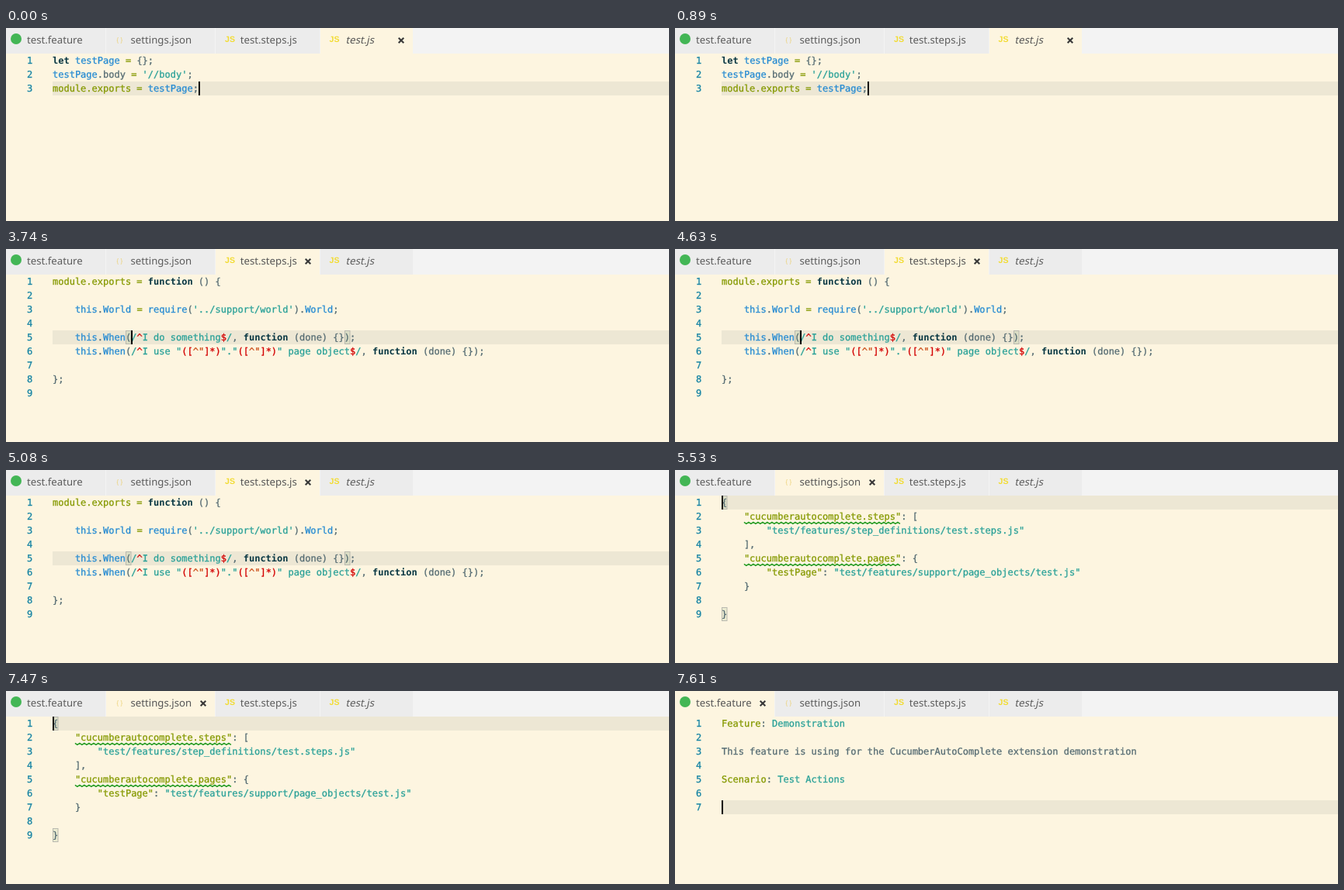
An HTML page that plays this animation: 854 by 249 pixels, repeating every 8 s.

```html
<!DOCTYPE html>
<html lang="en">
<head>
<meta charset="utf-8">
<title>Editor tabs</title>
<style>
html, body { margin: 0; width: 100%; height: 100%; overflow: hidden; background: #fdf5e0; }
svg { display: block; width: 854px; height: 249px; }
text { white-space: pre; text-rendering: geometricPrecision; }
.code text { font: 12px "DejaVu Sans Mono", monospace; }
.code text, .code tspan { fill: currentColor; stroke: currentColor; stroke-width: 0.3px; }
.tab { font: 13.2px "Noto Sans", sans-serif; }
.js { font: bold 10.6px "Liberation Sans", sans-serif; fill: #f2dc33; }
.json { font: 8px "Liberation Sans", sans-serif; fill: #ebd073; }
.n { color: #1684a4; }
.t { color: #566c73; }
.b { color: #268bd2; }
.g { color: #859900; }
.s { color: #2aa198; }
.r { color: #d30102; }
.o { color: #cb4b16; }
.k { color: #073642; font-weight: bold; }
.code .k { stroke: none; }
</style>
</head>
<body>
<svg id="stage" viewBox="0 0 854 249"></svg>
<script>
const NS = "http://www.w3.org/2000/svg";
const stage = document.getElementById("stage");
const LEFT = 60, TOP = 33, LINE = 18, CHAR = 7.2246, LOOP = 8000;

function add(parent, name, attrs, text) {
  const el = document.createElementNS(NS, name);
  for (const key in attrs) el.setAttribute(key, attrs[key]);
  if (text !== undefined) el.textContent = text;
  parent.appendChild(el);
  return el;
}
const rect = (parent, x, y, width, height, fill) =>
  add(parent, "rect", { x, y, width, height, fill });
const show = (el, on) => el.setAttribute("visibility", on ? "visible" : "hidden");
const lineTop = row => TOP + (row - 1) * LINE;
const colX = col => LEFT + col * CHAR;

const tabs = [
  { name: "test.feature", x: 0, w: 128, textX: 27, closeX: 113 },
  { name: "settings.json", x: 129, w: 140, textX: 160.5, closeX: 254 },
  { name: "test.steps.js", x: 270, w: 134, textX: 301.7, closeX: 389 },
  { name: "test.js", x: 405, w: 119, textX: 437.5, closeX: 509, slant: -12 }
];

// In code lines, "~" plus a letter switches the colour class.
// carets: times at which the caret turns on and off, starting with on.
const views = [
  {
    tab: 3, start: 0, row: 3, caretX: 248, carets: [0, 290, 890, 1340],
    lines: [
      "~klet~b testPage~g =~t {};",
      "~btestPage~t.body~g =~s '//body'~t;",
      "~gmodule.exports =~b testPage~t;"
    ]
  },
  {
    tab: 2, start: 3740, row: 5, caretX: 161, carets: [3740, 4190, 4630, 5080],
    brackets: [[5, 13], [5, 52]],
    lines: [
      "~gmodule.exports =~k function~t () {",
      "",
      "~b    this~t.~bWorld~g =~b require~t(~s'../support/world'~t).~bWorld~t;",
      "",
      "~b    this~t.~bWhen~t(~s/~r^~sI do something~r$~s/~t, ~kfunction~t (done) {});",
      "~b    this~t.~bWhen~t(~s/~r^~sI use \"~r([~o^\"~r]*)~s\".\"~r([~o^\"~r]*)~s\" page object~r$~s/~t, ~kfunction~t (done) {});",
      "",
      "~t};",
      ""
    ]
  },
  {
    tab: 1, start: 5530, row: 1, caretX: 60, carets: [5530, 5980, 6580, 7020, 7470, 7610],
    brackets: [[1, 0], [9, 0]], waves: [2, 5],
    lines: [
      "~t{",
      "~g    \"cucumberautocomplete.steps\"~t: [",
      "~s        \"test/features/step_definitions/test.steps.js\"",
      "~t    ],",
      "~g    \"cucumberautocomplete.pages\"~t: {",
      "~g        \"testPage\"~t: ~s\"test/features/support/page_objects/test.js\"",
      "~t    }",
      "",
      "~t}"
    ]
  },
  {
    tab: 0, start: 7610, row: 7, caretX: 60, carets: [7610, LOOP],
    lines: [
      "~gFeature~t: ~sDemonstration",
      "",
      "~tThis feature is using for the CucumberAutoComplete extension demonstration",
      "",
      "~gScenario~t: ~sTest Actions",
      "",
      ""
    ]
  }
];

function drawTabs() {
  rect(stage, 0, 0, 854, TOP, "#f3f3f3");
  for (const tab of tabs) {
    tab.back = rect(stage, tab.x, 0, tab.w, TOP, "#ececec");
    tab.label = add(stage, "text", {
      class: "tab", transform: `translate(${tab.textX} 20) skewX(${tab.slant || 0})`
    }, tab.name);
    const x = tab.closeX, y = 16;
    tab.close = add(stage, "path", {
      d: `M${x - 3.3} ${y - 3.3}l6.6 6.6m0 -6.6l-6.6 6.6`,
      stroke: "#383838", "stroke-width": 2.1, fill: "none"
    });
  }
  add(stage, "circle", { cx: 13, cy: 14, r: 7, fill: "#43b655" });
  add(stage, "text", { class: "json", x: 142.5, y: 17.5 }, "{ }");
  for (const x of [282, 416.5]) add(stage, "text", { class: "js", x, y: 18 }, "JS");
}

function drawWave(parent, row) {
  let d = `M${colX(4)} ${lineTop(row) + 16.4}`;
  for (let i = 0; i < 67; i++) d += `l3 ${i % 2 ? -2 : 2}`;
  add(parent, "path", { d, fill: "none", stroke: "#1f9a1f", "stroke-width": 1.4 });
}

function drawView(view) {
  const group = view.group = add(stage, "g", { class: "code" });
  rect(group, LEFT, lineTop(view.row), 854 - LEFT, LINE, "#ede7d4");
  for (const [row, col] of view.brackets || []) {
    add(group, "rect", {
      x: Math.round(colX(col)) + 0.5, y: lineTop(row) + 0.5, width: 6.5, height: LINE - 1,
      fill: "#006400", "fill-opacity": 0.07, stroke: "#b9b9b0"
    });
  }
  view.lines.forEach((line, i) => {
    const y = lineTop(i + 1) + 13;
    add(group, "text", { class: "n", x: 27, y }, i + 1);
    const text = add(group, "text", { x: LEFT, y });
    for (const part of line.split("~").slice(1)) {
      add(text, "tspan", { class: part[0] }, part.slice(1));
    }
  });
  (view.waves || []).forEach(row => drawWave(group, row));
  view.caret = rect(stage, view.caretX, lineTop(view.row), 2, LINE, "#000");
}

function render(time) {
  const current = views.filter(v => v.start <= time).pop();
  for (const view of views) {
    const active = view === current;
    show(view.group, active);
    show(view.caret, active && view.carets.filter(t => t <= time).length % 2 === 1);
  }
  tabs.forEach((tab, i) => {
    const active = i === current.tab;
    tab.back.setAttribute("fill", active ? "#fdf5e0" : "#ececec");
    tab.label.setAttribute("fill", active ? "#555" : "#5c5c5c");
    show(tab.close, active);
  });
}

function tick() {
  render(performance.now() % LOOP);
  requestAnimationFrame(tick);
}

rect(stage, 0, 0, 854, 249, "#fdf5e0");
drawTabs();
views.forEach(drawView);
tick();
</script>
</body>
</html>
```
